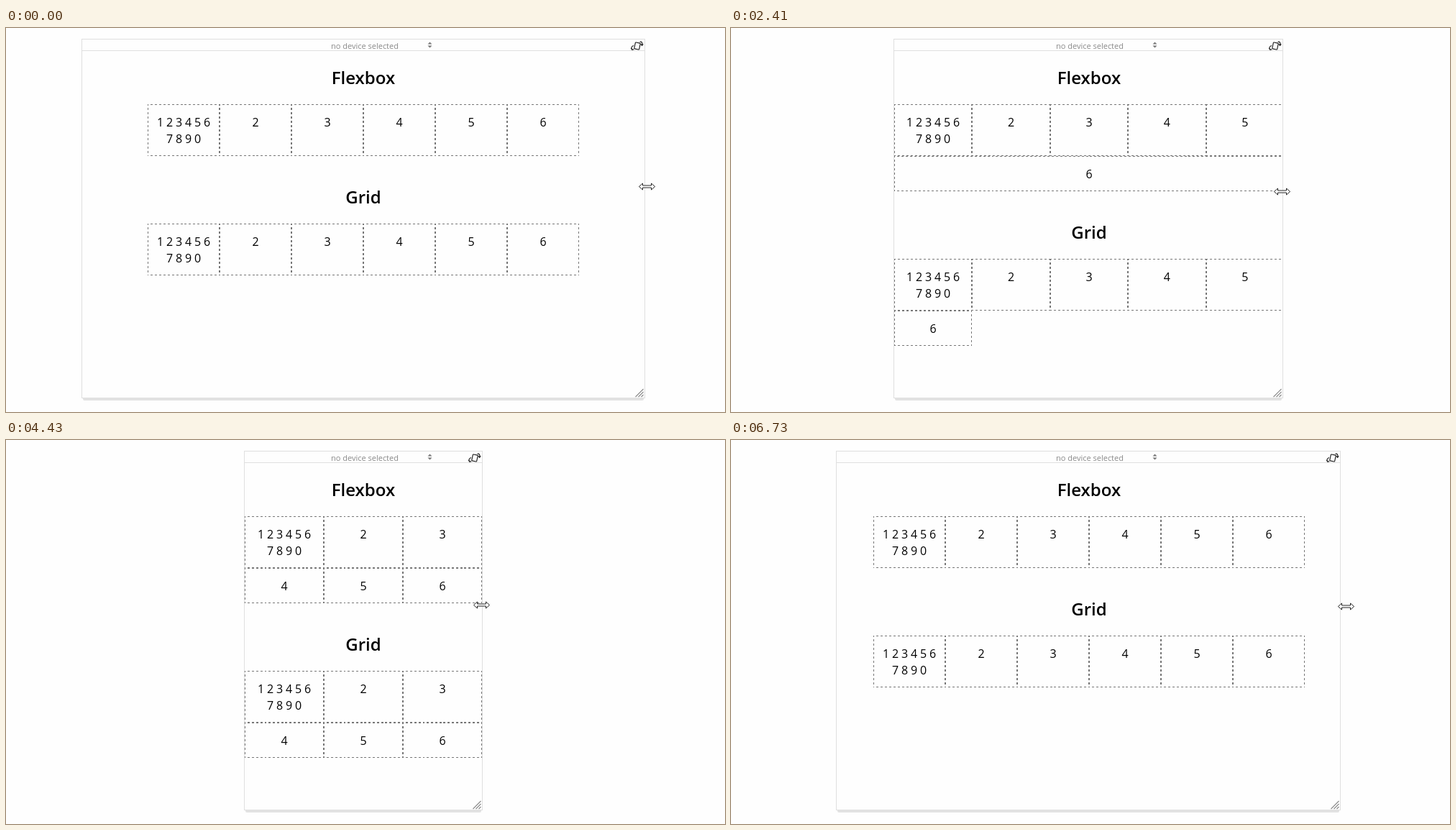
An HTML page that plays this animation: 1000x534 px, repeating every 6850 ms.

```html
<!DOCTYPE html>
<html lang="en">
<head>
<meta charset="utf-8">
<title>Flexbox and Grid</title>
<style>
  html, body { margin: 0; width: 100%; height: 100%; overflow: hidden; background: #fefefe; }
  svg { display: block; width: 100%; height: 100%; font-family: "Open Sans", "Noto Sans", sans-serif; }
  text { text-anchor: middle; }
  .head { font-size: 24px; font-weight: 600; }
  .num { font-size: 16px; word-spacing: -.3px; }
  .bar { font-size: 11px; fill: #8a8a8a; text-anchor: start; }
  .dash { stroke: #777; fill: none; shape-rendering: crispEdges; }
  .edge { fill: none; stroke: #dfdfdf; shape-rendering: crispEdges; }
  .icon { fill: none; stroke: #1c1c1c; stroke-width: 1.15; }
  .grip { fill: none; stroke: #8c8c8c; stroke-width: 1.2; }
</style>
</head>
<body>
<svg viewBox="0 0 1000 534">
  <defs><clipPath id="pane"><rect id="hole" y="32" height="482"/></clipPath></defs>
  <g id="frame"></g>
  <g id="page" clip-path="url(#pane)"></g>
  <g id="corner">
    <g class="icon">
      <rect x="-14.5" y="20.5" width="7" height="9" rx=".8" transform="rotate(12 -11 25)"/>
      <path d="M-16 24.5Q-20.5 26-18.3 30M-19.8 27.8L-18.2 30.4L-15.8 29.6M-7.5 19.3Q-3.2 18.5-4.3 24M-6.3 22.2L-4.4 24.4L-2.8 22.4"/>
    </g>
    <path class="grip" d="M-13.5 513L-2.5 502M-9.5 513L-2.5 506M-5.5 513L-2.5 510"/>
  </g>
  <text class="bar" x="452" y="29">no device selected</text>
  <path d="M586.5 22.5L589.5 19.5L592.5 22.5ZM586.5 24.5L589.5 27.5L592.5 24.5Z" fill="#777"/>
  <path id="cursor" d="M-11 0L-6-4.5V-1.5H6V-4.5L11 0L6 4.5V1.5H-6V4.5Z" fill="#fff" stroke="#222"/>
</svg>
<script>
const LOOP = 6850, CENTER = 497, MIN = 100, MAX = 600;

// Drag of the left edge: tick, x, surplus width of a late layout
const DRAG = [
  [4, 105, 0], [11, 150, 0], [17, 196, 4], [24, 266, 0], [31, 308, 2],
  [35, 328, 0], [37, 331, 0], [38, 331, 0], [44, 276, 0], [50, 219, 0], [56, 146, 2]
];

const el = id => document.getElementById(id);
const clamp = (v, lo, hi) => Math.min(hi, Math.max(lo, v));

// Redraws come every 120 ms, a little faster at the beginning
const tickAt = t => 11 + Math.floor((t - 1310) / (t < 1310 ? 110 : 120));

function dragAt(tick) {
  const n = clamp(tick, DRAG[0][0], DRAG[DRAG.length - 1][0]);
  const i = Math.max(1, DRAG.findIndex(k => n <= k[0]));
  const [from, x, late] = DRAG[i - 1], [to, x2, late2] = DRAG[i];
  const u = (n - from) / (to - from);
  return { left: Math.round(x + (x2 - x) * u), late: 2 * Math.round((late + (late2 - late) * u) / 2) };
}

// The pointer trails the edge inwards, then leads it outwards
function pointerAt(tick) {
  const n = Math.max(4, tick);
  return {
    dx: n < 38 ? Math.max(-1.5, 2.5 - (n - 4) * .3) : Math.min(7.5, (n - 38) * 1.17 - 1.5),
    y: Math.min(220 + (n - 4) * .86, 224.5 + n * .125, 231)
  };
}

const text = (cls, x, y, s) => `<text class="${cls}" x="${x}" y="${y}">${s}</text>`;

// Dashes start and end with half a dash so that corners join
function dashes(d, len) {
  const p = len / Math.ceil((len - 1) / 6);
  return `<path class="dash" d="${d}" stroke-dasharray="${p / 2}" stroke-dashoffset="${p / 4}"/>`;
}

function cell(x, y, w, h, label) {
  const lines = [label];
  if (label === 1) {
    const digits = [..."1234567890"], fit = Math.floor((w - 22) / 13);
    lines[0] = digits.slice(0, fit).join(" ");
    lines.push(digits.slice(fit).join(" "));
  }
  const l = Math.round(x), r = Math.round(x + w), b = y + h;
  return [y + .5, b - .5].map(v => dashes(`M${l} ${v}H${r}`, r - l)).join("") +
    [l + .5, r - .5].map(v => dashes(`M${v} ${y}V${b}`, h)).join("") +
    lines.map((s, i) => text("num", x + w / 2, y + 31 + i * 23, s)).join("");
}

function boxes(x, y, width, grow) {
  const cols = Math.min(6, Math.floor(width / MIN));
  let out = "";
  for (let i = 0; i < 6; i++) {
    const row = Math.floor(i / cols), inRow = Math.min(cols, 6 - row * cols);
    const w = width / (grow ? inRow : cols);
    out += cell(x + (i % cols) * w, y + row * 72, w, row ? 49 : 72, i + 1);
  }
  return { out, bottom: y + (cols < 6 ? 121 : 72) };
}

function draw(t) {
  const tick = tickAt(t), { left, late } = dragAt(tick), pointer = pointerAt(tick);
  const right = 2 * CENTER - left, inner = right - left - 2;
  const space = inner + late, width = Math.min(MAX, space), mid = left + 1 + space / 2;

  el("frame").innerHTML =
    `<rect x="${left + 2}" y="510" width="${inner - 2}" height="8" rx="2" fill="#e2e2e2"/>` +
    `<rect x="${left}" y="15" width="${inner + 2}" height="500" fill="#fefefe"/>` +
    `<path class="edge" d="M${left + .5} 15.5H${right - .5}V514.5H${left + .5}ZM${left} 31.5H${right}"/>`;

  el("hole").setAttribute("x", left + 1);
  el("hole").setAttribute("width", inner);
  const flex = boxes(mid - width / 2, 106, width, true);
  const grid = boxes(mid - width / 2, flex.bottom + 94, width, false);
  el("page").innerHTML = text("head", mid, 78, "Flexbox") + flex.out +
    text("head", mid, flex.bottom + 66, "Grid") + grid.out;

  el("corner").setAttribute("transform", `translate(${right})`);
  el("cursor").setAttribute("transform",
    `translate(${right + Math.round(pointer.dx - .5) + .5} ${Math.round(pointer.y) + .5})`);
}

const start = performance.now();
function run() {
  draw((performance.now() - start) % LOOP);
  requestAnimationFrame(run);
}
run();
</script>
</body>
</html>
```
